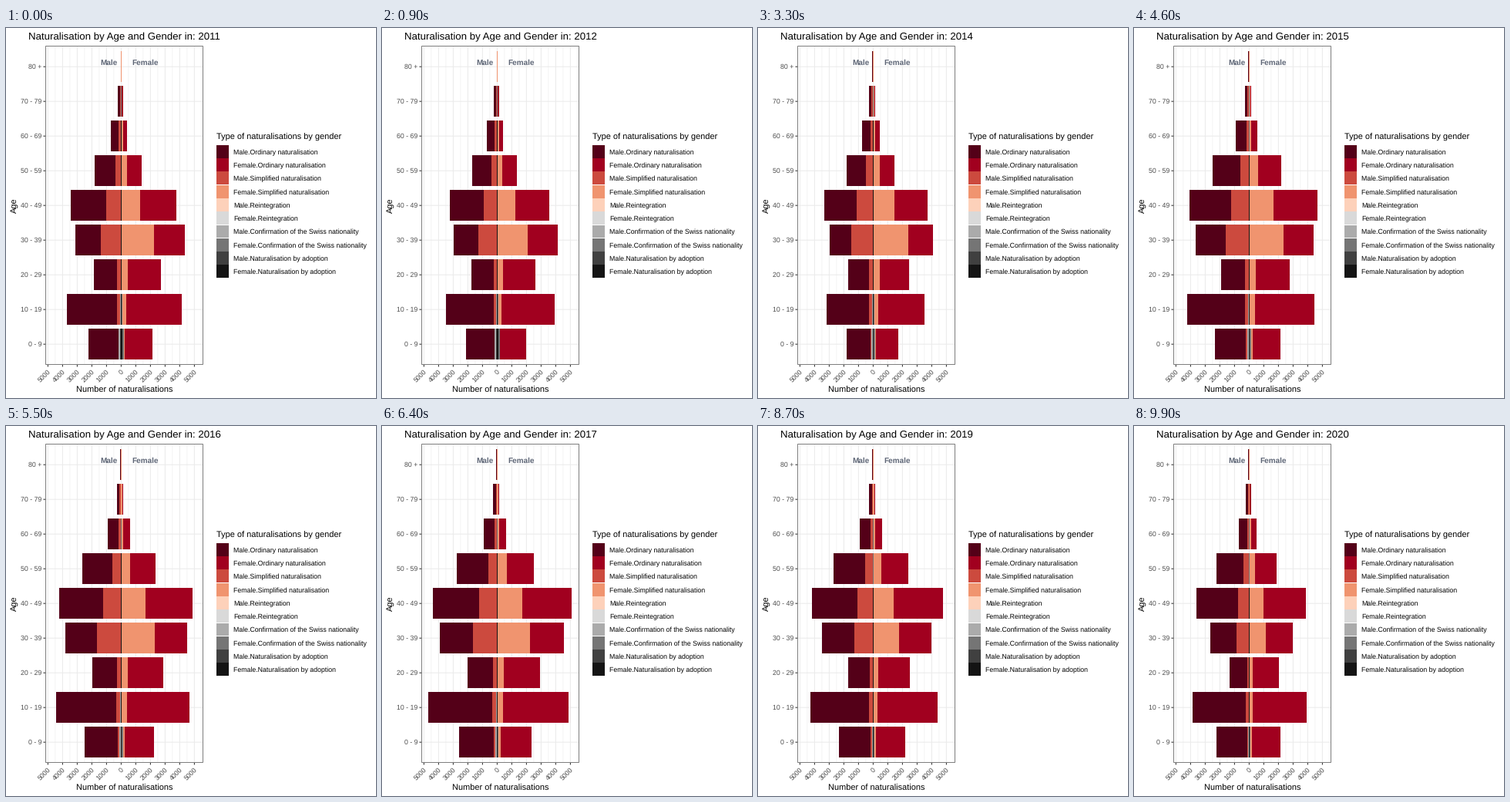
Recreate the animation shown at these times as a matplotlib script. Size 480 by 480 pixels, loop 10 s.

```python
import numpy as np
import matplotlib.pyplot as plt
from matplotlib.animation import FuncAnimation
from matplotlib.patches import Rectangle

plt.rcParams.update({
    "font.family": "Liberation Sans",
    "text.hinting": "none",
    "path.snap": False,
})

SIZE, DPI = 480, 72
FRAMES, INTERVAL = 100, 100
FIRST_YEAR, SPAN = 2011, 9

LEFT, RIGHT, TOP, BOTTOM = 51.5, 255.5, 23.5, 436.5
ZERO, SCALE = 149.4, 0.019
ROW_H, BAR_H = 45, 40
GREY20, GREY30, GREY92 = "#333333", "#4d4d4d", "#ebebeb"
BORDER, NOTE = "#7f7f7f", "#5f6777"

COLORS = ["#540018", "#a1001f", "#cc4a3e", "#f0946f", "#fdd1ba",
          "#d9d9d9", "#ababab", "#757575", "#404040", "#141414"]
KINDS = ["Ordinary naturalisation", "Simplified naturalisation",
         "Reintegration", "Confirmation of the Swiss nationality",
         "Naturalisation by adoption"]
ORDINARY, SIMPLIFIED, CONFIRMED, ADOPTED = 0, 1, 3, 4
SEXES = ["Male", "Female"]

# Per age group: (first, peak, last) for men and women, simplified share
GROUPS = [
    ((2230, 2590, 2180), (2085, 2325, 2085), 0.08),
    ((3705, 4725, 3860), (4135, 4900, 3925), 0.065),
    ((1860, 2030, 1285), (2715, 2940, 1980), 0.13),
    ((3125, 3945, 2650), (4345, 4570, 2975), 0.43),
    ((3390, 4415, 3600), (3765, 5130, 3870), 0.29),
    ((1760, 2790, 2180), (1400, 2495, 1870), 0.22),
    ((705, 920, 705), (400, 610, 505), 0.2),
    ((230, 285, 190), (90, 135, 95), 0.27),
    ((20, 60, 55), (20, 30, 30), 0.27),
]


def mix(a, b, f):
    return a + (b - a) * f


def total(first, peak, last, age, t):
    """Slump after the first year, climb to the peak, then fall back."""
    slump = 0.93 * first
    dip = first * min(0.8 + 0.045 * age, 1.07)
    fall = max(0.5 - 0.085 * age, 0)
    return np.interp(t, range(SPAN + 1), [
        first, slump, mix(slump, dip, 0.2), dip,
        mix(dip, peak, 0.63), mix(dip, peak, 0.82), peak,
        mix(peak, last, fall), mix(peak, last, fall + 0.15), last])


def share_trend(t):
    return np.interp(t, [0, 1, 3, 4, 6, 7, 9],
                     [1, 0.98, 1.15, 1.04, 0.95, 0.97, 0.72])


def layers(age, sex, t):
    """Cumulative counts by kind, measured from the axis outwards."""
    keys, share = GROUPS[age][sex], GROUPS[age][2]
    whole = total(*keys, age, t)
    minor = 0.3 ** age
    return {
        ORDINARY: whole,
        SIMPLIFIED: whole * share * (1 + 0.18 * sex) * share_trend(t),
        CONFIRMED: 150 * minor * np.exp(-t / 9),
        ADOPTED: (40 + 20 * sex) * minor * np.exp(-t / 4),
    }


def row_y(age):
    return 410 - ROW_H * age


def px(value):
    return ZERO + SCALE * value


fig = plt.figure(figsize=(SIZE / DPI, SIZE / DPI), dpi=DPI, facecolor="white")
ax = fig.add_axes([0, 0, 1, 1])
ax.set_xlim(0, SIZE)
ax.set_ylim(SIZE, 0)
ax.axis("off")


def line(x, y, color, width=1.07):
    ax.plot(x, y, color=color, lw=width, zorder=1, solid_capstyle="butt")


def label(x, y, text, size, color="black", **kw):
    return ax.text(x, y, text, fontsize=size, color=color, va="baseline",
                   zorder=6, **kw)


def block(x, y, w, h, color, z=2):
    return ax.add_patch(Rectangle((x, y), w, h, fc=color, lw=0, zorder=z,
                                  antialiased=False))


def draw_panel():
    for v in range(-4500, 5501, 1000):
        line([px(v)] * 2, [TOP, BOTTOM], GREY92, 0.53)
    for v in range(-5000, 5001, 1000):
        x = px(v)
        line([x, x], [TOP, BOTTOM], GREY92)
        line([x, x], [BOTTOM, BOTTOM + 3], GREY20)
        label(x + 4, 446.5, str(abs(v)), 8.8, GREY30, ha="right",
              rotation=45, rotation_mode="anchor")
    for age in range(len(GROUPS)):
        y = row_y(age) + 0.2
        name = f"{age}0 - {age}9".replace("00", "0").replace("09", "9")
        if age == len(GROUPS) - 1:
            name = f"{age}0 +"
        line([LEFT, RIGHT], [y, y], GREY92)
        line([LEFT - 3, LEFT], [y, y], GREY20)
        label(46.2, y + 3.2, name, 8.8, GREY30, ha="right")
    ax.add_patch(Rectangle((LEFT, TOP), RIGHT - LEFT, BOTTOM - TOP, fill=False,
                           ec=BORDER, lw=1, zorder=5))
    for x, sex in zip((133.8, 181), SEXES):
        label(x, 48, sex, 10, NOTE, ha="center", weight="bold")
    label(153.5, 473, "Number of naturalisations", 11, ha="center")
    label(13.5, 230.2, "Age", 11, ha="center", rotation=90,
          rotation_mode="anchor")


def draw_legend():
    label(272.8, 145, "Type of naturalisations by gender", 11)
    names = [f"{sex}.{kind}" for kind in KINDS for sex in SEXES]
    for i, (name, color) in enumerate(zip(names, COLORS)):
        y = 152 + 17.28 * i
        block(273, y + 0.4, 16, 15.8, color)
        label(295.2, y + 11.8, name, 8.8)


draw_panel()
draw_legend()
title = label(153.5, 15, "", 13.2, ha="center")

bars = {
    (age, sex, kind): block(ZERO, row_y(age) - BAR_H / 2, 0, BAR_H,
                            COLORS[2 * kind + sex], 2 + kind / 10)
    for age in range(len(GROUPS))
    for sex in range(2)
    for kind in (ORDINARY, SIMPLIFIED, CONFIRMED, ADOPTED)
}


def update(frame):
    t = SPAN * frame / (FRAMES - 1)
    year = FIRST_YEAR + round(t)
    title.set_text(f"Naturalisation by Age and Gender in: {year}")
    for age in range(len(GROUPS)):
        for sex, side in enumerate((-1, 1)):
            for kind, value in layers(age, sex, t).items():
                bars[age, sex, kind].set_width(side * SCALE * value)
    return [title, *bars.values()]


anim = FuncAnimation(fig, update, frames=FRAMES, interval=INTERVAL,
                     repeat=True, repeat_delay=0, blit=False)
plt.show()
```
